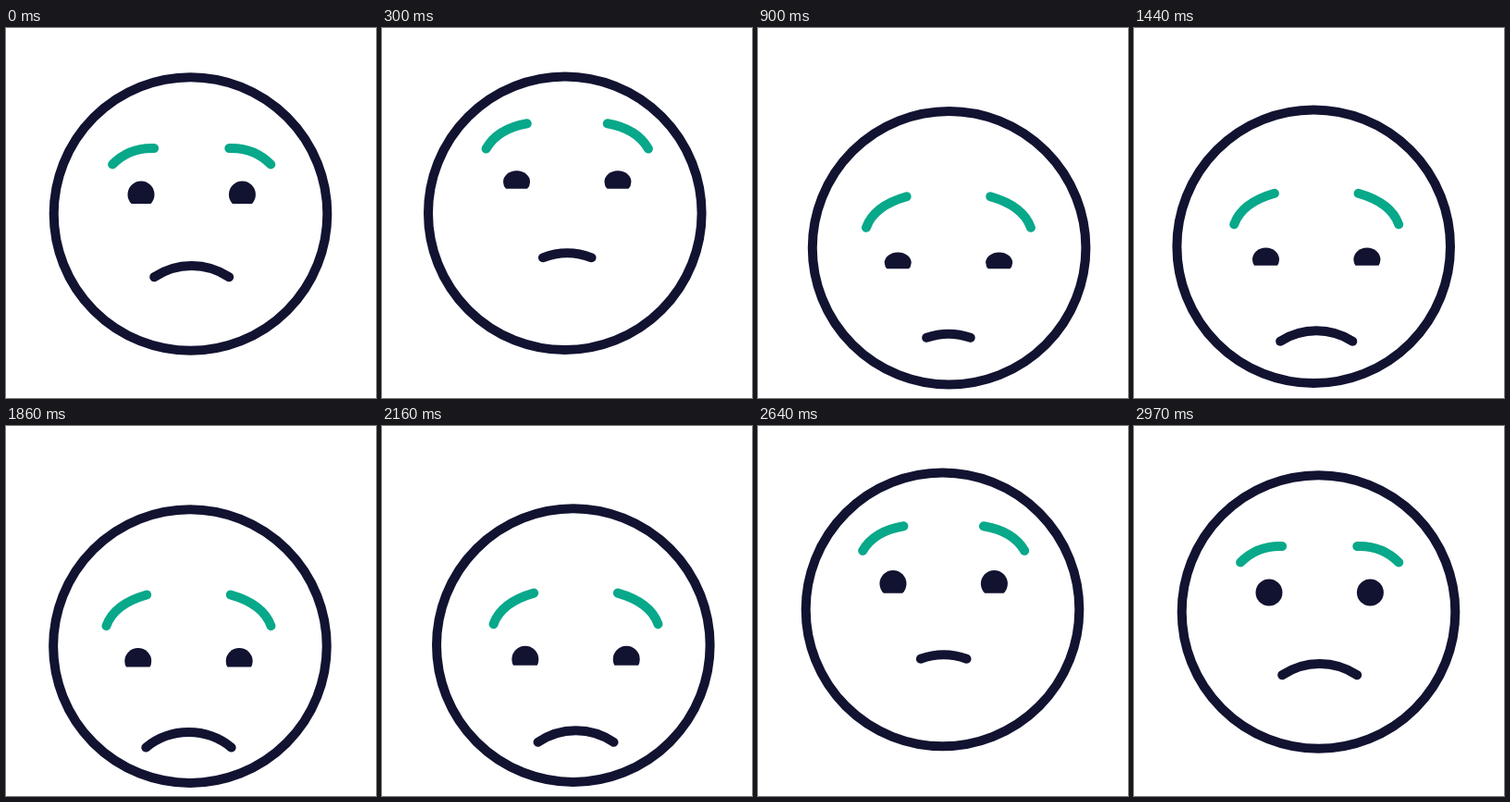
Recreate the animation shown at these times as an HTML page. Size 400x400 px, loop 4000 ms.

```html
<!DOCTYPE html>
<html lang="en">
<head>
<meta charset="utf-8">
<title>Sad face shaking its head</title>
<style>
  html, body { margin: 0; width: 100%; height: 100%; overflow: hidden; background: #fff; }
  svg { display: block; width: 100%; height: 100%; }
  .line { fill: none; stroke: #121331; stroke-width: 10; stroke-linecap: round; }
  .brow { stroke: #08a88a; }
  .eye { fill: #121331; }
</style>
</head>
<body>
<svg viewBox="0 0 400 400">
  <defs>
    <clipPath id="lids"><rect id="lid" x="-100" y="100" width="200" height="90"/></clipPath>
    <path id="brow" class="line brow"/>
  </defs>
  <circle id="head" class="line" r="147.8"/>
  <g id="face">
    <use href="#brow"/>
    <use href="#brow" transform="scale(-1 1)"/>
    <g clip-path="url(#lids)">
      <ellipse class="eye" cx="-54.7" cy="180" rx="14.5"/>
      <ellipse class="eye" cx="54.7" cy="180" rx="14.5"/>
    </g>
    <path id="mouth" class="line"/>
  </g>
</svg>
<script>
const LOOP = 4000, STEP = 30, LAST = 2970;
const SHAKE_START = 533, SHAKE_END = 2095, SWAY = 9;
const FACE_LAG = 46;
const { PI, sin, cos } = Math;
const $ = id => document.getElementById(id);

const mix = (a, b, u) => a + (b - a) * u;
const ramp = (t, from, to) => Math.min(1, Math.max(0, (t - from) / (to - from)));
const ease = (t, from, to) => {
  const u = ramp(t, from, to);
  return u * u * (3 - 2 * u);
};
// Rises to 1 between a and b, falls back to 0 between c and d.
const hold = (t, a, b, c, d) => ease(t, a, b) - ease(t, c, d);

// Three half swings, the middle one a little slower.
function swing(t) {
  const q = ramp(t, SHAKE_START, SHAKE_END);
  return PI * (3 * q + .085 * sin(2 * PI * q));
}

function headOffset(t) {
  const s = swing(t);
  const windUp = hold(t, 0, 210, 210, 540) + hold(t, 2160, 2460, 2460, 2740);
  return {
    x: -SWAY * cos(s) * hold(t, 210, SHAKE_START, SHAKE_END, 2330),
    y: (36.1 + sin(s)) * hold(t, 210, 540, 2160, 2460) - 9 * windUp,
  };
}

function browPath(worry) {
  const point = (x0, y0, x1, y1) => `${mix(x0, x1, worry)} ${mix(y0, y1, worry)}`;
  const outer = point(-85.6, 147.5, -89, 142);
  const bend = point(-67.5, 129, -80.6, 118.4);
  const inner = point(-40.6, 130, -45.3, 108.4);
  return `M${outer}Q${bend} ${inner}`;
}

// The mouth is a piece of one fixed circle, trimmed to the given half angle.
function mouthPath(angle, r = 73, top = 257) {
  const half = r * sin(angle), end = top + r * (1 - cos(angle));
  return `M${-half} ${end}A${r} ${r} 0 0 1 ${half} ${end}`;
}

function draw(t) {
  const head = headOffset(t);
  $('head').setAttribute('transform', `translate(${199.5 + head.x} ${201 + head.y})`);

  // The features trail the head and travel twice as far vertically.
  const face = headOffset(t - FACE_LAG);
  $('face').setAttribute('transform', `translate(${200.7 + face.x} ${2 * face.y})`);

  $('brow').setAttribute('d', browPath(hold(t, 60, 480, 2420, 2900)));

  const lid = 190 - 3.6 * hold(t, 0, 450, 2100, 2460) + 6 * ease(t, 2600, 2900);
  $('lid').setAttribute('height', lid - 100);
  const eyeHeight = 14.5 - 3.5 * hold(t, 0, 500, 500, 2300);
  for (const eye of document.querySelectorAll('.eye')) eye.setAttribute('ry', eyeHeight);

  const frown = .588 - .338 * ease(t, 0, 500) + .44 * ease(t, 500, 1950)
    - .36 * ease(t, 1950, 2580) + .258 * ease(t, 2580, 2960);
  $('mouth').setAttribute('d', mouthPath(frown));
}

const start = performance.now();
function tick() {
  const t = (performance.now() - start) % LOOP;
  draw(Math.min(LAST, Math.floor(t / STEP) * STEP));
  requestAnimationFrame(tick);
}
tick();
</script>
</body>
</html>
```
